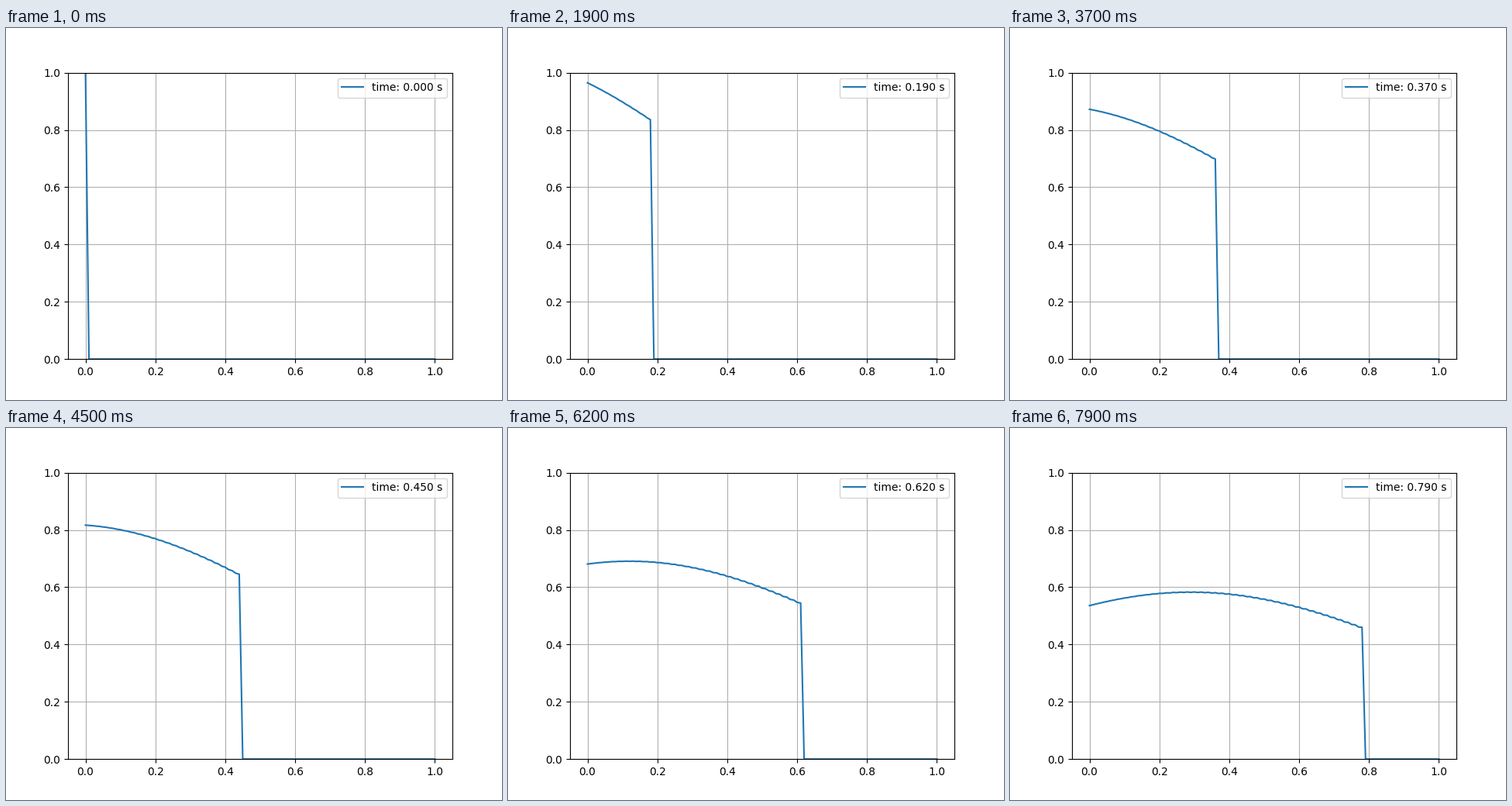
A matplotlib script that plays this animation: 640 px wide and 480 px high, repeating every 8000 ms.

```python
import numpy as np
import matplotlib.pyplot as plt
from matplotlib.animation import FuncAnimation

FRAMES = 80
H = 0.01  # space and time step, wave speed 1
K = 1.0   # damping rate

x = np.linspace(0, 1, 101)


def pulse(t):
    """Signal fed in at the left end."""
    return np.exp(-t ** 2)


def solve():
    """Damped wave u_tt + 2K u_t + K^2 u = u_xx, explicit central scheme."""
    u = np.zeros((FRAMES, x.size))
    u[:, 0] = pulse(H * np.arange(FRAMES))
    for n in range(1, FRAMES - 1):
        now, old = u[n], u[n - 1]
        u[n + 1, 1:-1] = (now[2:] + now[:-2]
                          - (1 - K * H) * old[1:-1]
                          - (K * H) ** 2 * now[1:-1]) / (1 + K * H)
    return u


u = solve()

fig, ax = plt.subplots(figsize=(6.4, 4.8), dpi=100)
line, = ax.plot(x, u[0], label="time: 0.000 s")
ax.set_xlim(-0.05, 1.05)
ax.set_ylim(0, 1)
ax.grid(True)
legend = ax.legend(loc="upper right")
label = legend.get_texts()[0]


def update(n):
    line.set_ydata(u[n])
    label.set_text(f"time: {n * H:.3f} s")
    return line, label


anim = FuncAnimation(fig, update, frames=FRAMES, interval=100,
                     repeat=True, repeat_delay=0)
plt.show()
```
